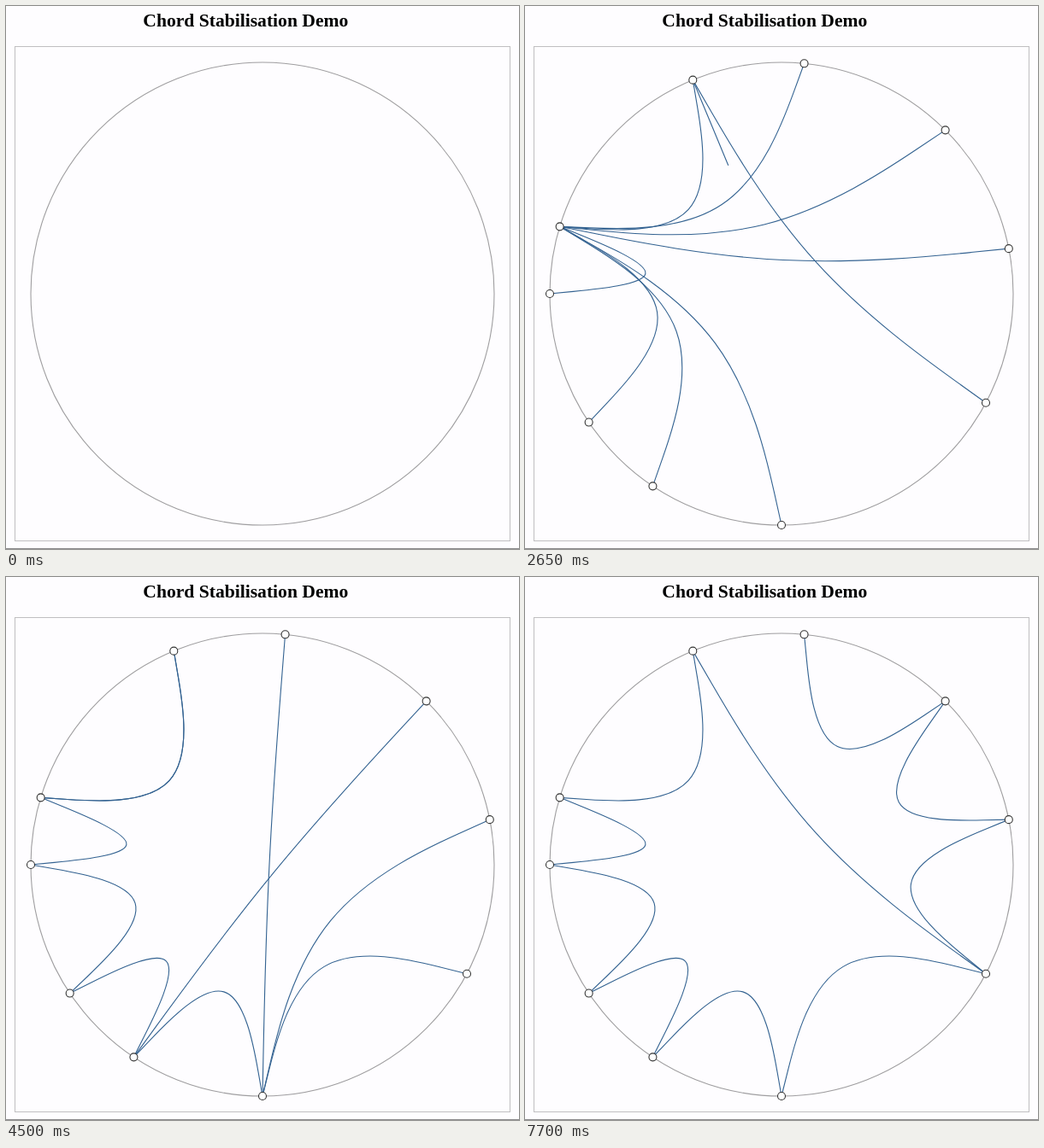
Write an HTML page that moves like this. It is 600 by 636 pixels and loops after 8 s.

```html
<!DOCTYPE html>
<html lang="en">
<head>
<meta charset="utf-8">
<title>Chord Stabilisation Demo</title>
<style>
  html, body { margin: 0; width: 100%; height: 100%; overflow: hidden; background: #fefdff; }
  svg { display: block; }
  text { font: bold 21.6px "Liberation Serif", "Times New Roman", serif; fill: #000; }
  .frame { fill: none; stroke: #c0bfc1; }
  .ring { fill: none; stroke: #9f9ea0; stroke-width: 1.1; }
  .rule { stroke: #8c8b8d; }
  .link { fill: none; stroke: #336291; stroke-width: 1.1; }
  .node { fill: #fff; stroke: #333; stroke-width: 1.1; }
</style>
</head>
<body>
<svg width="600" height="636" viewBox="0 0 600 636">
  <text x="160.3" y="23.5">Chord Stabilisation Demo</text>
  <rect class="frame" x="10.5" y="47.5" width="579" height="579"/>
  <path class="rule" d="M0 635.5H600"/>
  <circle class="ring" cx="300" cy="337" r="271"/>
  <g id="links"></g>
  <g id="nodes"></g>
</svg>
<script>
const LOOP = 8000, JOIN = 200;
const CENTER = [300, 337], RADIUS = 271, SLOTS = 64, TENSION = 0.6;

// Ring slot of each node, clockwise from the right-hand side
const slots = { A: 44, B: 49, C: 56, D: 62, E: 5, F: 16, G: 22, H: 26, I: 32, J: 35 };

// Time and the successor changes made then: "BA" points B at A
const steps = [
  [200, "AA"], [250, "IA JA"], [300, "BA EA"], [400, "CA FA"], [450, "GA"],
  [1550, "DA"], [1600, "HA"],
  [2150, "GJ HJ"],
  [2400, "BJ"], [2450, "IJ"], [2500, "DJ"], [2550, "FJ"], [2650, "CJ"],
  [2700, "EJ"], [2750, "HI"], [2800, "GI"], [2850, "FI"], [2900, "BI"],
  [3000, "DI"], [3050, "CI"], [3100, "EI"], [3150, "FH"], [3200, "CH"],
  [3250, "GH"], [3350, "EH"], [3450, "FG"], [3550, "DH"], [3700, "EG"],
  [3800, "AJ"], [3900, "CG"], [4050, "DG"],
  [4100, "BH"], [4200, "EF"], [4300, "BG"], [4400, "DF"], [4500, "BF"],
  [5000, "DE"], [5050, "CF"], [5150, "BE"], [5200, "CE"],
  [5550, "AA JJ"], [5600, "CD"], [5650, "BD"], [5700, "AJ"],
  [6050, "AI"], [6550, "AG BC"],
  [7250, "JA"], [7650, "AD"], [7700, "AE"]
];

const place = slot => {
  const a = slot / SLOTS * 2 * Math.PI;
  return [CENTER[0] + RADIUS * Math.cos(a), CENTER[1] + RADIUS * Math.sin(a)];
};

const add = (parent, tag, attrs) => {
  const el = document.createElementNS("http://www.w3.org/2000/svg", tag);
  for (const key in attrs) el.setAttribute(key, attrs[key]);
  return parent.appendChild(el);
};

// B-spline from p to q, bundled towards the ring's centre
const chord = (p, q) => {
  const c = p.map((v, i) => TENSION * CENTER[i] + (1 - TENSION) * (v + q[i]) / 2);
  const mix = (a, b, d) =>
    p.map((v, i) => ((a * v + b * c[i] + d * q[i]) / 6).toFixed(2)).join(" ");
  return `M${mix(6, 0, 0)}L${mix(5, 1, 0)}` +
    `C${mix(4, 2, 0)} ${mix(2, 4, 0)} ${mix(1, 4, 1)}` +
    `C${mix(0, 4, 2)} ${mix(0, 2, 4)} ${mix(0, 1, 5)}L${mix(0, 0, 6)}`;
};

const linkLayer = document.getElementById("links");
const nodeLayer = document.getElementById("nodes");
const points = {}, links = {};
for (const id in slots) {
  const [cx, cy] = points[id] = place(slots[id]);
  links[id] = add(linkLayer, "path", { class: "link" });
  add(nodeLayer, "circle", { class: "node", cx, cy, r: 4.5 });
}

function draw(t) {
  const next = {};
  for (const [at, changes] of steps) {
    if (at > t) break;
    for (const [from, to] of changes.split(" ")) next[from] = to;
  }
  nodeLayer.style.display = t < JOIN ? "none" : "";
  for (const id in links) {
    links[id].setAttribute("d", next[id] ? chord(points[id], points[next[id]]) : "");
  }
}

const start = performance.now();
function tick() {
  draw((performance.now() - start) % LOOP);
  requestAnimationFrame(tick);
}
tick();
</script>
</body>
</html>
```
